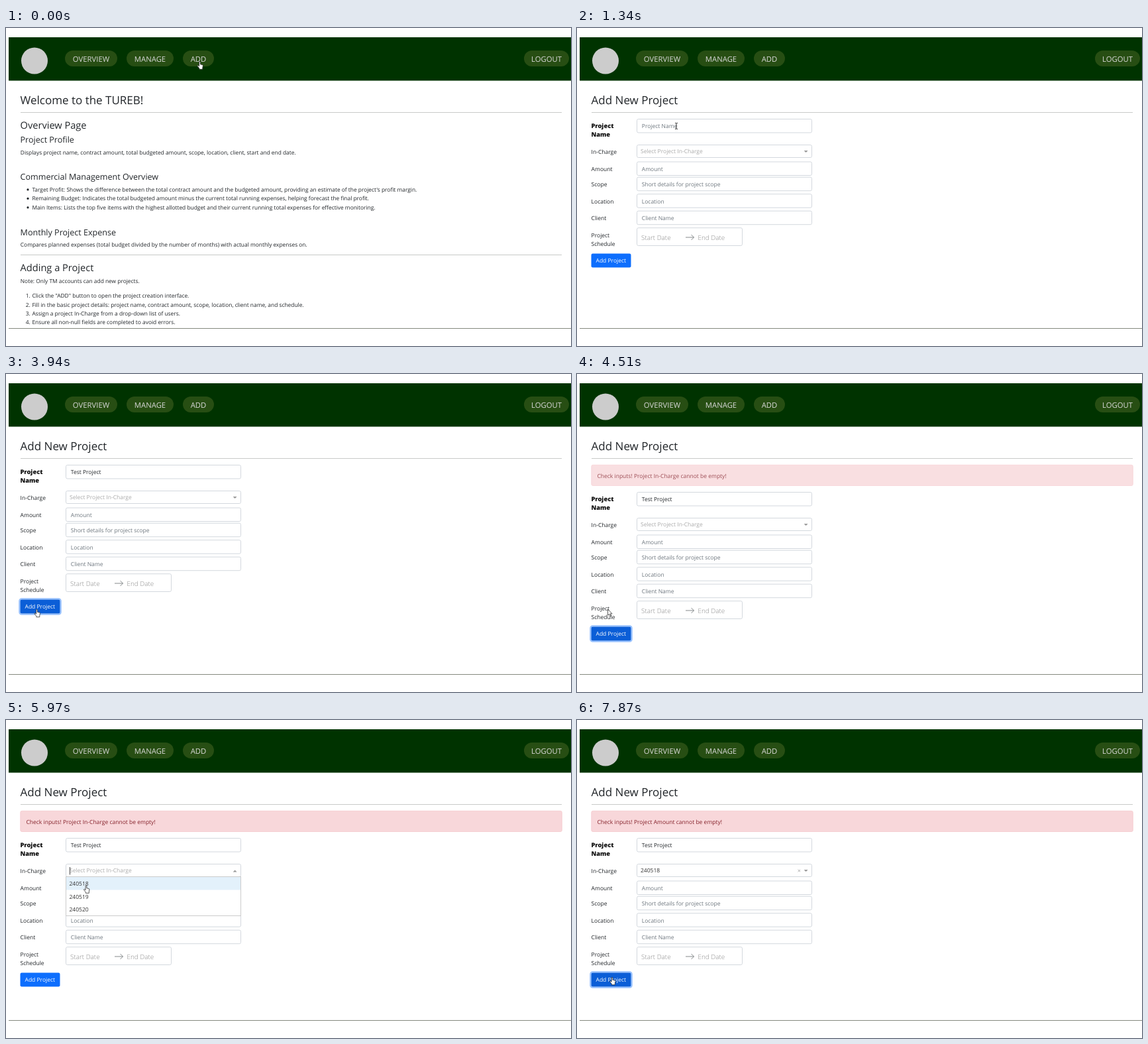
Animation of 853 by 480 pixels, one loop 8 s. Source, as an HTML page:

```html
<!DOCTYPE html>
<html lang="en">
<head>
<meta charset="utf-8">
<title>Add New Project</title>
<style>
html, body { margin: 0; width: 100%; height: 100%; overflow: hidden; background: #fff; }
svg { display: block; width: 853px; height: 480px; font-family: "Open Sans", "Noto Sans", sans-serif; }
text { white-space: pre; text-rendering: geometricPrecision; }
</style>
</head>
<body>
<svg id="stage" viewBox="0 0 853 480"></svg>
<script>
const LOOP = 8000;
const INK = '#212529', HINT = '#6c757d', EDGE = '#d3d8de';

const text = (x, y, size, str, fill = INK, more = '') =>
  `<text x="${x}" y="${y}" font-size="${size}" fill="${fill}" ${more}>${str}</text>`;
const rect = (x, y, w, h, fill, more = '') =>
  `<rect x="${x}" y="${y}" width="${w}" height="${h}" fill="${fill}" ${more}/>`;
const rule = y => rect(22, y, 817, 1, '#c8cac8');
const box = (y, h, w = 264, more = '') =>
  rect(90.5, y, w, h, '#fff', `rx="2.2" stroke="${EDGE}" ${more}`);
const group = (id, body) => `<g id="${id}">${body}</g>`;

const pill = (x, w, str) => rect(x, 34, w, 24, '#274e13', 'rx="12"') +
  text(x + w / 2, 50.6, 11.3, str, '#d9d9d9', 'text-anchor="middle"');

const header = rect(4, 14, 849, 65.5, '#003300') +
  '<circle cx="43" cy="49.5" r="20" fill="#cccccc"/>' +
  pill(89, 79, 'OVERVIEW') + pill(182, 71, 'MANAGE') +
  pill(267, 47, 'ADD') + pill(782, 68, 'LOGOUT');

const line = (y, str) => text(21.8, y, 8.4, str);
const item = (y, mark, str) =>
  (mark ? text(29.7, y, 8.4, mark) : `<circle cx="33" cy="${y - 2.9}" r="1.6" fill="${INK}"/>`) +
  text(39.4, y, 8.4, str);

const welcome =
  text(21.6, 115, 17, 'Welcome to the TUREB!') + rule(127) +
  text(21.6, 152.3, 14.6, 'Overview Page') +
  text(21.6, 173.3, 12.5, 'Project Profile') +
  line(190.6, 'Displays project name, contract amount, total budgeted amount, scope, location, client, start and end date.') +
  text(21.6, 229.2, 12.55, 'Commercial Management Overview') +
  item(246.8, '', 'Target Profit: Shows the difference between the total contract amount and the budgeted amount, providing an estimate of the project\'s profit margin.') +
  item(260.3, '', 'Remaining Budget: Indicates the total budgeted amount minus the current total running expenses, helping forecast the final profit.') +
  item(273.8, '', 'Main Items: Lists the top five items with the highest allotted budget and their current running total expenses for effective monitoring.') +
  text(21.6, 312.8, 12.55, 'Monthly Project Expense') +
  line(330.2, 'Compares planned expenses (total budget divided by the number of months) with actual monthly expenses on.') +
  rule(342) +
  text(21.6, 367.4, 14.6, 'Adding a Project') +
  line(385.2, 'Note: Only TM accounts can add new projects.') +
  item(407.4, '1.', 'Click the "ADD" button to open the project creation interface.') +
  item(420.8, '2.', 'Fill in the basic project details: project name, contract amount, scope, location, client name, and schedule.') +
  item(434.2, '3.', 'Assign a project In-Charge from a drop-down list of users.') +
  item(447.4, '4.', 'Ensure all non-null fields are completed to avoid errors.');

const field = (y, h, base, label, hint) =>
  text(21.6, base, 8.5, label) + box(y, h) + text(97.8, base, 8.5, hint, HINT);
const bold = 'font-weight="800"';
const option = (y, n) => text(95.5, y, 8.5, n, '#333');

const form =
  text(21.4, 150.8, 9.3, 'Project', '#111', bold) + text(21.4, 164.2, 9.3, 'Name', '#111', bold) +
  rect(89.4, 135.6, 266.2, 23.6, 'none', 'id="nameRing" rx="3.3" stroke="#0d6efd" stroke-opacity=".3" stroke-width="2.3"') +
  box(137.5, 20.5, 264, 'id="nameBox"') +
  text(97.8, 151, 8.5, '', HINT, 'id="nameText"') +
  rect(0, 141.5, .9, 12, INK, 'id="caret"') +
  text(21.6, 189.8, 8.5, 'In-Charge') +
  box(176.5, 19, 264, 'id="pickBox"') +
  text(96, 189, 8.5, '', '#aaa', 'id="pickText"') +
  '<path id="clear" d="M333.6 184.8l3.4 3.4m0-3.4l-3.4 3.4" stroke="#999" stroke-width=".8"/>' +
  '<path id="tip" fill="#999"/>' +
  field(202, 20.5, 215.6, 'Amount', 'Amount') +
  field(225.2, 20.5, 239, 'Scope', 'Short details for project scope') +
  field(250.7, 20.5, 264.5, 'Location', 'Location') +
  field(276.2, 20.5, 290, 'Client', 'Client Name') +
  text(21.6, 315.5, 8.5, 'Project') + text(21.6, 328.8, 8.5, 'Schedule') +
  box(301.7, 26.8, 159) +
  text(97, 319.6, 9.9, 'Start Date', '#8a8a8a', 'font-weight="300"') +
  text(182.6, 319.6, 9.9, 'End Date', '#8a8a8a', 'font-weight="300"') +
  '<path d="M164 316h12.5m-4-4l4 4l-4 4" fill="none" stroke="#767b7d" stroke-width=".9"/>' +
  rect(20.4, 339.4, 62.2, 23.2, 'none', 'id="goRing" rx="3.2" stroke="#3184fd" stroke-opacity=".5" stroke-width="2.3"') +
  rect(21.5, 340.5, 60, 21, '#0d6efd', 'id="go" rx="2.2"') +
  text(28.5, 354, 8.5, 'Add Project', '#fff') +
  group('menu',
    rect(90.5, 195.5, 264, 59, '#fff', 'stroke="#ccc"') +
    rect(91, 196, 263, 19.5, '#e3f1fb') +
    rect(96.1, 181, .9, 11.5, '#333') +
    option(209.3, '240518') + option(228.8, '240519') + option(248.3, '240520'));

const alertBox = rect(21.8, 137.3, 817.5, 31.2, '#f8d7da', 'rx="2.2" stroke="#f5c9cd" stroke-width=".8"') +
  text(30.4, 156.6, 8.53, '', '#842029', 'id="alertText"');

const ink = 'stroke="#222" stroke-width=".75" stroke-linejoin="round"';
const cursors = {
  arrow: `<path d="M0 0V9.4L2.2 7.4L3.7 10.8L5.1 10.2L3.6 6.9H6.6Z" fill="#fff" ${ink}/>`,
  hand: `<path d="M-.9 .8Q0-.5 .9 .8V4.3L4 5Q5 5.3 4.9 6.5L4.3 9.7V11.8H-.7V10.3L-3.4 7Q-3.6 5.6-2.4 5.9L-.9 7.2Z" fill="#fff" ${ink}/>`,
  beam: '<path d="M-2-4.6Q0-4.6 0-3.8Q0-4.6 2-4.6M0-3.8V3.8M-2 4.6Q0 4.6 0 3.8Q0 4.6 2 4.6" fill="none" stroke="#222" stroke-width=".9"/>'
};

document.getElementById('stage').innerHTML =
  rect(0, 0, 853, 480, '#fff') + header +
  group('welcome', welcome) +
  group('project',
    text(21.6, 115, 17, 'Add New Project') + rule(127) +
    group('alert', alertBox) + group('form', form)) +
  rect(4, 453, 849, 1, '#84897f') +
  group('cursor', Object.entries(cursors).map(([id, body]) => group(id, body)).join(''));

const el = {};
document.querySelectorAll('[id]').forEach(e => el[e.id] = e);

// time, x, y of the pointer
const track = [
  [0, 292.5, 50.5], [420, 292.5, 50.5], [770, 273.2, 58], [1300, 150, 148],
  [3250, 150, 148], [3620, 46.5, 355], [4650, 46.5, 355], [5200, 122, 228],
  [5550, 122, 228], [5850, 121, 249.5], [6250, 121, 249.5], [6480, 123.3, 254.5],
  [6690, 123.3, 254.5], [7080, 53, 388], [LOOP, 53, 388]
];
const shapes = [
  [0, 'hand'], [560, 'arrow'], [1230, 'beam'], [2050, ''], [3250, 'beam'], [3400, 'arrow'],
  [3580, 'hand'], [4390, 'arrow'], [5640, 'hand'], [6240, 'beam'], [6860, 'arrow'], [6990, 'hand']
];
const keys = [2080, 2200, 2320, 2430, 2550, 2740, 2830, 2920, 3010, 3090, 3180, 3280];
const TITLE = 'Test Project';

const during = (t, a, b) => t >= a && t < b;
const show = (e, on) => e.setAttribute('visibility', on ? 'inherit' : 'hidden');
const put = (e, str) => { if (e.textContent !== str) e.textContent = str; };
const attr = (e, set) => { for (const k in set) e.setAttribute(k, set[k]); };

function pointer(t) {
  const i = Math.max(1, track.findIndex(p => p[0] > t));
  const [a, x0, y0] = track[i - 1], [b, x1, y1] = track[i];
  const u = (t - a) / (b - a), k = u * u * (3 - 2 * u);
  return [x0 + (x1 - x0) * k, y0 + (y1 - y0) * k];
}

function draw(t) {
  const loaded = t >= 400, failed = t >= 4390;
  show(el.welcome, !loaded);
  show(el.project, loaded);
  show(el.alert, loaded && failed);
  el.alert.setAttribute('opacity', Math.min(1, Math.max(0, .45 + (t - 4390) / 350)));
  put(el.alertText, `Check inputs! Project ${t < 7580 ? 'In-Charge' : 'Amount'} cannot be empty!`);
  el.form.setAttribute('transform', `translate(0 ${failed ? 41 : 0})`);

  const typed = TITLE.slice(0, keys.filter(k => k <= t).length);
  const focus = during(t, 1500, 3700);
  put(el.nameText, typed || 'Project Name');
  attr(el.nameText, { fill: typed ? INK : HINT });
  attr(el.nameBox, { stroke: focus ? '#86b7fe' : EDGE });
  show(el.nameRing, loaded && focus);
  show(el.caret, focus);
  if (focus) el.caret.setAttribute('x', 97.6 + (typed ? el.nameText.getComputedTextLength() : 0));

  const open = during(t, 5450, 6200), picked = t >= 6200, lit = during(t, 6200, 7300);
  put(el.pickText, picked ? '240518' : 'Select Project In-Charge');
  attr(el.pickText, { fill: picked ? '#333' : '#aaa' });
  attr(el.pickBox, { stroke: lit ? '#3b98f5' : EDGE, 'stroke-width': lit ? 1.5 : 1 });
  attr(el.tip, { d: open ? 'M342.6 188.4h6l-3-3z' : 'M342.6 185h6l-3 3z' });
  show(el.menu, open);
  show(el.clear, picked);
  attr(el.clear, { opacity: lit ? .6 : 1 });

  const hover = during(t, 3580, 4700) || t >= 7030;
  attr(el.go, { fill: hover ? '#0b5ed7' : '#0d6efd' });
  show(el.goRing, during(t, 3700, 5400) || t >= 7300);

  const shape = shapes.filter(s => s[0] <= t).pop()[1];
  for (const id in cursors) show(el[id], id === shape);
  const [x, y] = pointer(t);
  el.cursor.setAttribute('transform', `translate(${x.toFixed(2)} ${y.toFixed(2)})`);
}

const start = performance.now();
function tick(now) {
  draw(Math.max(0, now - start) % LOOP);
  requestAnimationFrame(tick);
}
draw(0);
requestAnimationFrame(tick);
</script>
</body>
</html>
```
